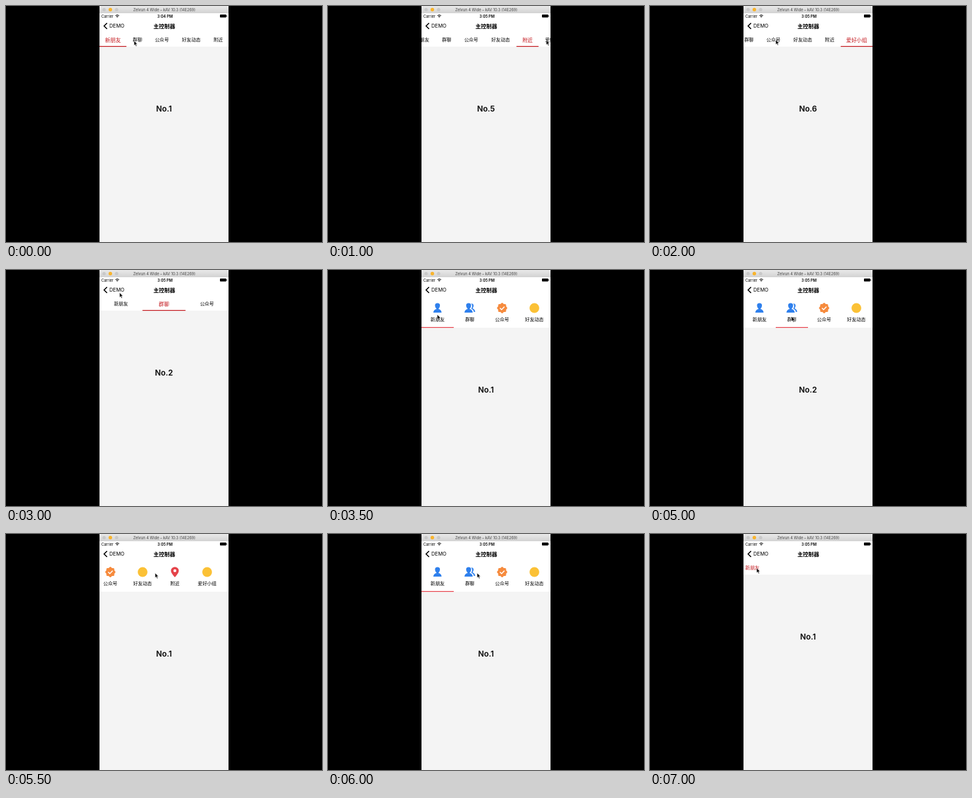
Write an HTML page that moves like this. It is 480 px wide and 360 px high and loops after 7500 ms.

```html
<!DOCTYPE html>
<html lang="zh-CN">
<head>
<meta charset="utf-8">
<title>Tabs</title>
<style>
  html, body { margin: 0; width: 100%; height: 100%; overflow: hidden; background: #000; }
  #stage { display: block; width: 480px; height: 360px; }
  text { font-family: Inter, "Noto Sans CJK SC", "Noto Sans CJK", sans-serif; text-anchor: middle; }
  .left { text-anchor: start; }
</style>
</head>
<body>
<svg id="stage" viewBox="0 0 480 360">
  <defs>
    <linearGradient id="bar" x2="0" y2="1">
      <stop stop-color="#e9e9e9"/><stop offset="1" stop-color="#d2d2d2"/>
    </linearGradient>
  </defs>
  <svg x="142" width="196" height="360">
    <rect width="196" height="360" fill="#f4f4f4"/>
    <g id="page"></g>
    <path d="M0 11V3Q0 0 3 0H193Q196 0 196 3V11Z" fill="url(#bar)"/>
    <circle cx="7" cy="5.5" r="2.6" fill="#c9c9c9"/>
    <circle cx="16.5" cy="5.5" r="2.7" fill="#f8b42e"/>
    <circle cx="26" cy="5.5" r="2.6" fill="#c9c9c9"/>
    <text x="98.5" y="7.7" font-size="5.75" fill="#444">Zelvun 4 Wide – kAV 10.3 (14E269)</text>
    <text class="left" x="3" y="17.6" font-size="5.5">Carrier</text>
    <g fill="none" stroke="#000" stroke-width=".9">
      <path d="M24.2 14.6Q27 12.2 29.8 14.6M25.3 15.9Q27 14.5 28.7 15.9"/>
    </g>
    <circle cx="27" cy="17" r=".7"/>
    <text id="clock" x="99.5" y="17.6" font-size="5.7" font-weight="600"></text>
    <rect x="183" y="13" width="9.6" height="4.6" rx=".8"/>
    <rect x="193" y="14.5" width=".8" height="1.6"/>
    <path d="M11.5 26L7 30.5L11.5 35" fill="none" stroke="#000" stroke-width="1.6"/>
    <text class="left" x="15" y="33.4" font-size="7.7">DEMO</text>
    <text x="98.5" y="33.6" font-size="8.2" font-weight="700">主控制器</text>
  </svg>
  <path id="cursor" d="M0 0V7.2L1.7 5.7L2.9 8.4L4.1 7.9L2.9 5.3H5.1Z" stroke="#fff" stroke-width=".5"/>
</svg>
<script>
const $ = id => document.getElementById(id);
const LABELS = ["新朋友", "群聊", "公众号", "好友动态", "附近", "爱好小组"];
const RED = "#c3161c";
const person = "M-7.5 7Q-7.5 3-2.5 1.2Q-5-1-5-3.8Q-5-7.5-1.2-7.5T2.6-3.8Q2.6-1 .2 1.2Q5 3 5 7Z";
const ICONS = [
  `<path d="${person}" fill="#2f80ed" transform="translate(1)"/>`,
  `<path d="M2-7Q6.5-6.5 5.5-2.5Q5-.5 4 .6Q8 2.5 8 6H6Q6 3 2 1Q5-3 2-7Z" fill="#2f80ed"/>
   <path d="${person}" fill="#2f80ed" transform="translate(-.7)"/>`,
  `<g fill="#f68b3e"><rect x="-6" y="-6" width="12" height="12" rx="1.5"/>
   <rect x="-6" y="-6" width="12" height="12" rx="1.5" transform="rotate(45)"/></g>
   <path d="M-3.3 0L-.8 2.5L3.5-2" fill="none" stroke="#fff" stroke-width="1.5"/>`,
  `<circle r="7.4" fill="#fbc136"/>`,
  `<path d="M0 8Q-6 1.5-6-2A6 5.8 0 0 1 6-2Q6 1.5 0 8Z" fill="#e5434a"/>
   <circle cy="-2" r="2.2" fill="#fff"/>`,
  `<circle r="7.4" fill="#fbc136"/>`
];

// One state per half second: style, selected tab, tab scroll, cursor x, cursor y
const STEP = 500;
const STATES = [
  ["text", 1, 0, 194.5, 53], ["text", 3, 0, 306, 53],
  ["text", 5, 19.3, 331.5, 52], ["text", 6, 49.4, 312, 52],
  ["text", 6, 49.4, 191, 51.5], ["text", 3, 0, 191, 51.5],
  ["even", 2, 0, 172.5, 34.5], ["icon", 1, 0, 166, 68],
  ["icon", 2, 0, 311, 71], ["icon", 4, 41.5, 264, 71],
  ["icon", 2, 0, 215, 71], ["icon", 1, 106, 226.5, 59.5],
  ["icon", 1, 0, 226.5, 59.5], ["single", 1, 0, 176, 52],
  ["single", 1, 0, 162, 52]
];
const STYLES = {
  text: { count: 6, width: s => 7.4 * s.length + 18.7, big: 7.9, line: RED },
  even: { count: 3, width: () => 196 / 3, big: 7.9, line: RED },
  icon: { count: 6, width: () => 49, big: 7.1, line: "#e8404a", icons: true },
  single: { count: 1, width: () => 27, big: 7.1 }
};

function drawPage([name, selected, scroll]) {
  const style = STYLES[name];
  const bottom = style.icons ? 88 : 62;
  let svg = `<rect width="196" height="${bottom}" fill="#fff"/>`;
  let x = -scroll;
  LABELS.slice(0, style.count).forEach((label, i) => {
    const on = i + 1 === selected;
    const w = style.width(label);
    const mid = x + w / 2;
    const size = on ? style.big : 7.1;
    const y = (style.icons ? 75.4 : 51.5) + size * .38;
    if (style.icons) svg += `<g transform="translate(${mid} 58)">${ICONS[i]}</g>`;
    svg += `<text x="${mid}" y="${y}" font-size="${size}" fill="${on && !style.icons ? RED : "#000"}">${label}</text>`;
    if (on && style.line)
      svg += `<rect x="${x}" y="${bottom - 1}" width="${w}" height="1.2" fill="${style.line}"/>`;
    x += w;
  });
  return svg + `<text x="98" y="${bottom + 99}" font-size="11.8" font-weight="600">No.${selected}</text>`;
}

let shown = -1;
function tick(now) {
  const step = Math.floor(now / STEP) % STATES.length;
  if (step !== shown) {
    shown = step;
    const state = STATES[step];
    $("page").innerHTML = drawPage(state);
    $("clock").textContent = step < 2 ? "3:04 PM" : "3:05 PM";
    $("cursor").setAttribute("transform", `translate(${state[3]} ${state[4]})`);
  }
  requestAnimationFrame(tick);
}
tick(0);
</script>
</body>
</html>
```
